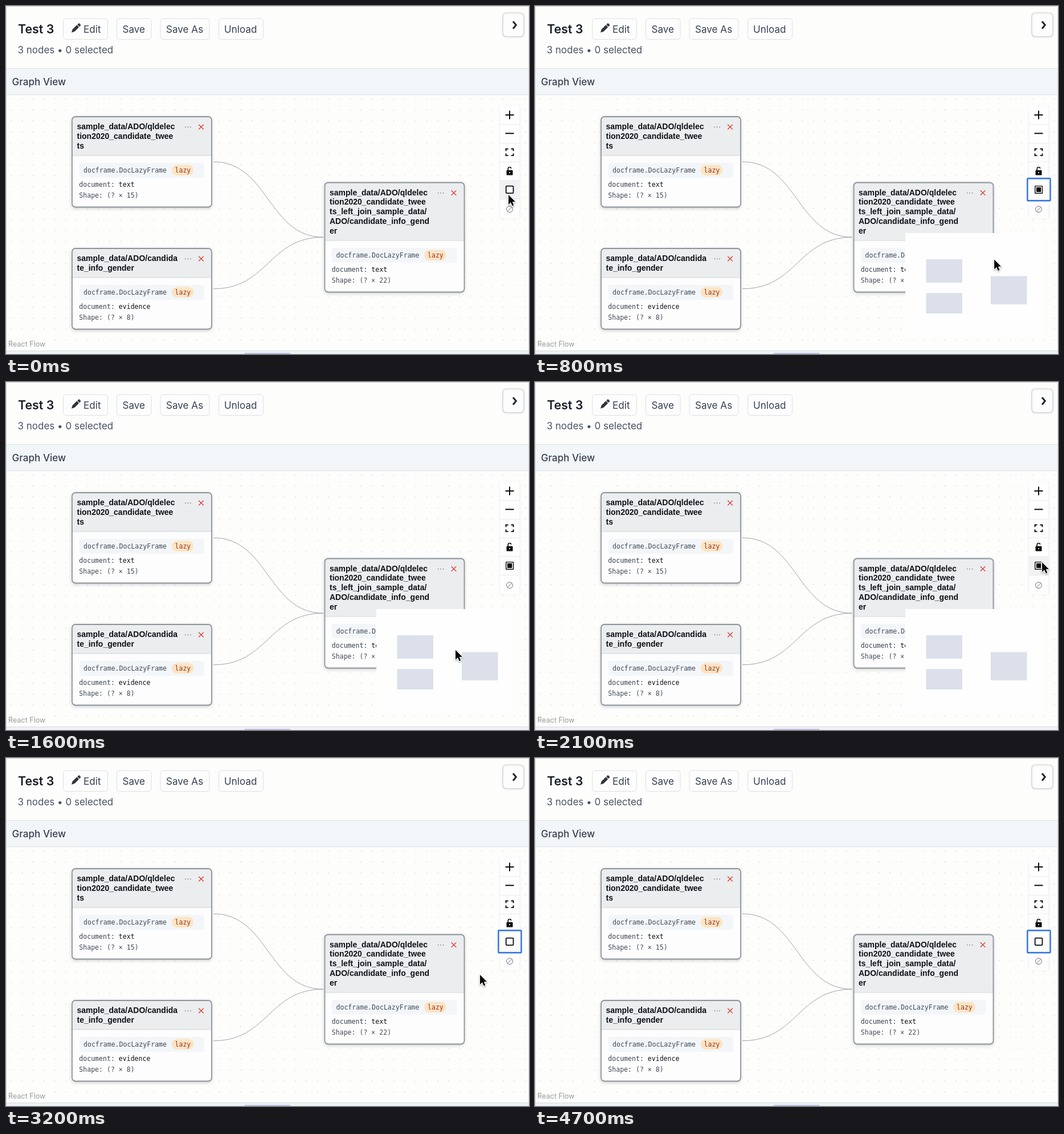
Animation of 918 by 610 pixels, one loop 4800 ms. Source, as an HTML page with a canvas:

```html
<!DOCTYPE html>
<html lang="en">
<head>
<meta charset="utf-8">
<title>Graph View</title>
<style>
  html, body { margin: 0; width: 100%; height: 100%; overflow: hidden; background: #fdfdfc; }
  canvas { display: block; width: 918px; height: 610px; }
</style>
</head>
<body>
<canvas id="stage"></canvas>
<script>
const W = 918, H = 610, LOOP = 4800;
const SANS = 'Inter, "Liberation Sans", sans-serif';
const TITLE = 'bold 14px "Liberation Sans", Arial, sans-serif';
const MONO = '"DejaVu Sans Mono", "Liberation Mono", monospace';
const canvas = document.getElementById('stage');
const ctx = canvas.getContext('2d');
const dpr = window.devicePixelRatio || 1;
canvas.width = W * dpr;
canvas.height = H * dpr;

const NODES = [
  { x: 115, y: 193, split: 262, bottom: 353, kind: 'text', cols: 15,
    title: ['sample_data/ADO/qldelec', 'tion2020_candidate_twee', 'ts'] },
  { x: 115, y: 424, split: 476, bottom: 567, kind: 'evidence', cols: 8,
    title: ['sample_data/ADO/candida', 'te_info_gender'] },
  { x: 558.5, y: 308.5, split: 411, bottom: 502, kind: 'text', cols: 22,
    title: ['sample_data/ADO/qldelec', 'tion2020_candidate_twee',
            'ts_left_join_sample_data/', 'ADO/candidate_info_gend', 'er'] }
];

// Pointer stops: time, x, y
const STOPS = [
  [0, 882, 331], [520, 882, 331], [950, 777, 488], [1500, 777, 488],
  [2000, 890, 316], [2650, 890, 316], [3150, 832, 380], [LOOP, 832, 380]
];
const POINTER_GONE = 4250;

function rect(x, y, w, h, color) {
  ctx.fillStyle = color;
  ctx.fillRect(x, y, w, h);
}

function box(x, y, w, h, r, fill, stroke, width = 1) {
  ctx.beginPath();
  ctx.roundRect(x, y, w, h, r);
  if (fill) { ctx.fillStyle = fill; ctx.fill(); }
  if (stroke) { ctx.strokeStyle = stroke; ctx.lineWidth = width; ctx.stroke(); }
}

function text(str, x, y, font, color) {
  ctx.font = font;
  ctx.fillStyle = color;
  ctx.fillText(str, x, y);
}

function line(points, color, width) {
  ctx.beginPath();
  points.forEach(([x, y], i) => i ? ctx.lineTo(x, y) : ctx.moveTo(x, y));
  ctx.strokeStyle = color;
  ctx.lineWidth = width;
  ctx.stroke();
}

function shadow(color, blur, dy) {
  ctx.shadowColor = color;
  ctx.shadowBlur = blur * dpr;
  ctx.shadowOffsetY = dy * dpr;
}

function noShadow() { shadow('transparent', 0, 0); }

function drawPencil() {
  ctx.save();
  ctx.translate(115, 46.5);
  ctx.rotate(-Math.PI / 4);
  ctx.fillStyle = '#30343b';
  ctx.beginPath();
  ctx.moveTo(0, 0);
  ctx.lineTo(5, -2.7);
  ctx.lineTo(16, -2.7);
  ctx.lineTo(16, 2.7);
  ctx.lineTo(5, 2.7);
  ctx.fill();
  box(17, -2.7, 4, 5.4, 1.5, '#30343b');
  ctx.restore();
}

function drawHeader() {
  rect(0, 0, W, 109, '#fdfdfc');
  text('Test 3', 21, 48, `600 21.4px ${SANS}`, '#161c27');
  const buttons = [['Edit', 100, 78.5, 136], ['Save', 194, 61, 204.5],
                   ['Save As', 270.5, 86.5, 281], ['Unload', 373, 78.5, 383]];
  for (const [label, x, w, tx] of buttons) {
    box(x + .5, 22, w - .5, 36.5, 5, '#fdfdfd', '#dcdfe7');
    text(label, tx, 46.5, `400 17.1px ${SANS}`, '#374151');
  }
  drawPencil();
  text('3 nodes • 0 selected', 20.5, 82.8, `400 17px ${SANS}`, '#4b5563');

  shadow('rgba(0,0,0,.1)', 3, 1);
  box(872, 12, 37, 41.5, 6, '#fdfdfd', '#d0d3d6', 1.2);
  noShadow();
  line([[890, 27], [895.3, 33.3], [890, 39.8]], '#1f2937', 3);

  rect(0, 109, W, 47, '#f3f6f8');
  rect(0, 109, W, 1, '#dcdfe4');
  rect(0, 155, W, 1, '#dcdfe4');
  text('Graph View', 10.5, 139, `500 17.1px ${SANS}`, '#374151');
}

function drawDots() {
  ctx.fillStyle = '#c3c5d0';
  const gap = 19.2;
  for (let y = 163; y < 603; y += gap)
    for (let x = 9; x < W; x += gap) ctx.fillRect(x - .6, y - .6, 1.2, 1.2);
}

function drawEdge(x1, y1, x2, y2) {
  const mid = (x1 + x2) / 2;
  ctx.beginPath();
  ctx.moveTo(x1, y1);
  ctx.bezierCurveTo(mid, y1, mid, y2, x2, y2);
  ctx.strokeStyle = '#a0a1a4';
  ctx.lineWidth = 1;
  ctx.stroke();
}

function drawNode({ x, y, split, bottom, kind, cols, title }) {
  const w = 246, h = bottom - y;
  shadow('rgba(0,0,0,.18)', 6, 2);
  box(x, y, w, h, 6, '#fdfdfd');
  noShadow();
  ctx.save();
  ctx.beginPath();
  ctx.roundRect(x, y, w, h, 6);
  ctx.clip();
  rect(x, y, w, split - y, '#ebedee');
  rect(x, split - .5, w, 1, '#d2d6da');
  ctx.restore();
  box(x + 1, y + 1, w - 1, h - 1.5, 6, null, '#8c949b', 1.8);

  title.forEach((s, i) => text(s, x + 9.5, y + 23 + i * 16.8, TITLE, '#0e1116'));
  for (let i = 0; i < 3; i++) rect(x + 199.5 + i * 4.4, y + 18.5, 1.5, 1.5, '#777c85');
  const cx = x + 227.5, cy = y + 19, r = 4.3;
  line([[cx - r, cy - r], [cx + r, cy + r]], '#e03c3c', 1.3);
  line([[cx - r, cy + r], [cx + r, cy - r]], '#e03c3c', 1.3);

  const mono = `11.55px ${MONO}`;
  box(x + 13.5, split + 13, 219.5, 26, 4, '#f3f6f9');
  text('docframe.DocLazyFrame', x + 21, split + 30, mono, '#414b59');
  box(x + 175.5, split + 16.5, 39, 18.5, 9.2, '#fde4c4');
  text('lazy', x + 181.5, split + 30, mono, '#96351a');
  text('document:', x + 13.3, split + 55, mono, '#374151');
  text(kind, x + 13.3 + 69.5, split + 55, mono, '#0d1117');
  text(`Shape: (? × ${cols})`, x + 13.3, split + 73.7, mono, '#414b59');
}

function drawMiniMap() {
  rect(650, 398, 243, 182, '#fefefe');
  box(686.5, 444, 63.5, 41, 1, '#dce0ea');
  box(686.5, 503, 63.5, 36, 1, '#dce0ea');
  box(800, 473.5, 63.5, 49.5, 1, '#dce0ea');
}

function drawControls(hover, focus, checked) {
  const cx = 884, ink = '#0c0c0c';
  shadow('rgba(0,0,0,.1)', 3, 0);
  rect(867, 174.5, 34.5, 197.5, '#fefefe');
  noShadow();
  if (hover) rect(867, 305, 34.5, 33, '#f1f2f3');
  for (let i = 1; i < 6; i++) rect(867, 174.5 + i * 32.7, 34.5, 1, '#e9eaec');

  rect(cx - 7.5, 190, 15, 2, ink);
  rect(cx - 1, 183.5, 2, 15, ink);
  rect(cx - 7.5, 222.3, 15, 2, ink);

  for (const sx of [-1, 1]) for (const sy of [-1, 1]) {
    const x = cx + sx * 6.5, y = 256.3 + sy * 5.8;
    line([[x - sx * 4, y], [x, y], [x, y - sy * 3.7]], ink, 1.9);
  }

  box(cx - 5.5, 287.8, 11, 8.6, 1.2, ink);
  ctx.beginPath();
  ctx.moveTo(cx - 2.8, 288);
  ctx.lineTo(cx - 2.8, 285.5);
  ctx.arc(cx, 285.3, 2.8, Math.PI, Math.PI * 1.95);
  ctx.strokeStyle = ink;
  ctx.lineWidth = 1.6;
  ctx.stroke();
  ctx.beginPath();
  ctx.arc(cx, 292, 1.1, 0, 7);
  ctx.fillStyle = '#fefefe';
  ctx.fill();

  box(cx - 6.3, 315.6, 12.8, 12.6, checked ? .5 : 1.5, '#fefefe', ink, checked ? 1.4 : 1.8);
  if (checked) rect(cx - 4, 317.8, 8.2, 8.2, ink);

  ctx.beginPath();
  ctx.arc(cx, 356.3, 5.4, 0, 7);
  ctx.strokeStyle = '#6a6d72';
  ctx.lineWidth = 1;
  ctx.stroke();
  line([[cx - 3.8, 360.1], [cx + 3.8, 352.5]], '#6a6d72', 1);

  if (focus) box(864.3, 302.2, 40.2, 39.1, 1, null, '#2f72e4', 2.4);
}

function drawPointer(x, y) {
  ctx.save();
  ctx.translate(x, y);
  ctx.beginPath();
  ctx.moveTo(0, 0);
  ctx.lineTo(0, 17);
  ctx.lineTo(4, 13.3);
  ctx.lineTo(6.7, 19.4);
  ctx.lineTo(9.4, 18.2);
  ctx.lineTo(6.8, 12.3);
  ctx.lineTo(12, 12);
  ctx.closePath();
  shadow('rgba(0,0,0,.3)', 3, 1.5);
  ctx.lineJoin = 'round';
  ctx.strokeStyle = '#fff';
  ctx.lineWidth = 2.4;
  ctx.stroke();
  noShadow();
  ctx.fillStyle = '#080808';
  ctx.fill();
  ctx.restore();
}

function pointerAt(t) {
  const i = STOPS.findIndex((s, k) => k && t <= s[0]);
  const [t0, x0, y0] = STOPS[i - 1], [t1, x1, y1] = STOPS[i];
  const p = (t - t0) / (t1 - t0), e = p * p * (3 - 2 * p);
  return [x0 + (x1 - x0) * e, y0 + (y1 - y0) * e];
}

function draw(t) {
  ctx.setTransform(dpr, 0, 0, dpr, 0, 0);
  rect(0, 0, W, H, '#fdfdfb');
  drawDots();
  drawHeader();
  drawEdge(364, 273, 557, 405.3);
  drawEdge(364, 495.7, 557, 405.3);
  NODES.forEach(drawNode);
  text('React Flow', 4, 597, `400 12.6px ${SANS}`, '#999a9d');

  const checked = t >= 300 && t < 2400;
  const focus = (t >= 300 && t < 1500) || t >= 2400;
  const [px, py] = pointerAt(t);
  const visible = t < POINTER_GONE;
  const hover = visible && px > 867 && px < 901 && py > 305 && py < 338;
  if (checked) drawMiniMap();
  drawControls(hover, focus, checked);

  rect(0, 604, W, 6, '#eef1f5');
  rect(0, 604, W, 1, '#d5d8de');
  rect(419, 608, 80, 2, '#bcbfe0');
  rect(0, 0, W, 1, '#cfd0d6');
  rect(0, 0, 1, H, '#d2d3d9');
  rect(W - 1, 0, 1, H, '#dfe0e5');
  if (visible) drawPointer(px, py);
}

const start = performance.now();
function tick() {
  draw((performance.now() - start) % LOOP);
  requestAnimationFrame(tick);
}
tick();
</script>
</body>
</html>
```
